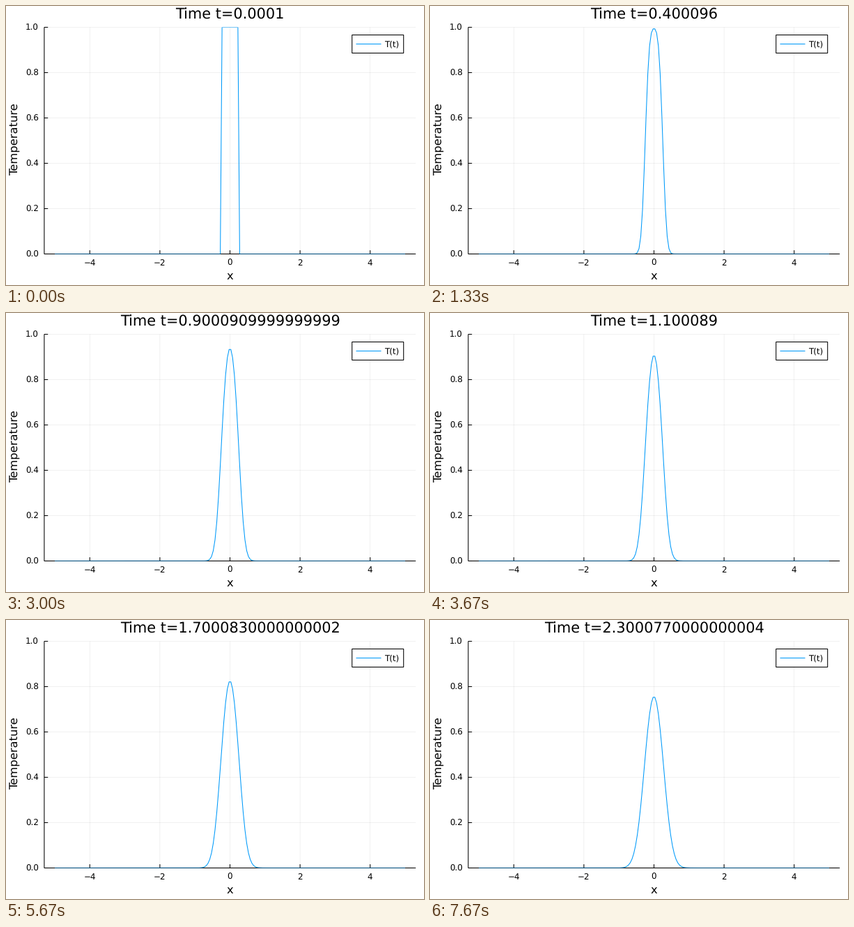
These frames come from a looping animation (600x400 px, 8000 ms). A matplotlib script:

```python
import math

import matplotlib.pyplot as plt
import numpy as np
from matplotlib.animation import FuncAnimation
from matplotlib.patches import Rectangle
from matplotlib.path import Path

WIDTH, HEIGHT, DPI = 600, 400, 100
STATES, LOOP_MS = 24, 8000
TICKS_PER_STATE = 10
FRAMES = STATES * TICKS_PER_STATE
PX = 72 / DPI  # points per pixel
BLUE = "#009AFA"
TITLE, GUIDE, SMALL = 20.83, 16.37, 11.9  # font sizes in pixels

# Plot area in pixels, measured from the top left corner
X0, X_SCALE = 321.5, 50.3
LEFT, RIGHT, TOP, BOTTOM = 54.9, 588.1, 30.5, 355.5

T_START, T_END, STEPS = 0.0001, 10.0, 100
DIFFUSIVITY, HALF_WIDTH = 0.01, 0.25
xs = np.linspace(-5, 5, 200)
erf = np.vectorize(math.erf)

plt.rcParams.update({"font.family": "DejaVu Sans", "text.hinting": "none"})
fig = plt.figure(figsize=(WIDTH / DPI, HEIGHT / DPI), dpi=DPI, facecolor="white")
stage = fig.add_axes([0, 0, 1, 1])
stage.set(xlim=(0, WIDTH), ylim=(HEIGHT, 0))
stage.axis("off")


def px(x):
    return X0 + X_SCALE * x


def py(y):
    return BOTTOM - (BOTTOM - TOP) * y


def line(x, y, color="black", width=1.05, **kwargs):
    return stage.plot(x, y, color=color, lw=width * PX, snap=False,
                      solid_capstyle="butt", **kwargs)[0]


def label(x, y, text, size, ha="center", **kwargs):
    return stage.text(x, y, text, fontsize=size * PX, ha=ha, va="baseline", **kwargs)


def time_at(step):
    s = step / STEPS
    return (1 - s) * T_START + s * T_END


def temperature(t):
    """Heat equation solution for an initially hot slab."""
    spread = math.sqrt(4 * DIFFUSIVITY * t)
    return (erf((HALF_WIDTH - xs) / spread) + erf((HALF_WIDTH + xs) / spread)) / 2


def draw_axes():
    grid = dict(alpha=0.1, width=0.55, zorder=1)
    for x in (-4, -2, 0, 2, 4):
        line([px(x)] * 2, [TOP, BOTTOM], **grid)
        line([px(x)] * 2, [BOTTOM, BOTTOM - 5.3], zorder=2)
        label(px(x), 371.5, str(x).replace("-", "\u2212"), SMALL)
    for i in range(6):
        y = py(i / 5)
        line([LEFT, RIGHT], [y, y], **grid)
        line([LEFT, LEFT + 5.3], [y, y], zorder=2)
        label(47, y + 4.5, f"{i / 5:.1f}", SMALL, ha="right")
    line([LEFT, LEFT], [TOP, BOTTOM], zorder=2)
    line([LEFT, RIGHT], [BOTTOM, BOTTOM], zorder=2)
    label(X0, 391.5, "x", GUIDE)
    label(17.6, 191.5, "Temperature", GUIDE, rotation=90, rotation_mode="anchor")


def draw_legend():
    stage.add_patch(Rectangle((496.7, 41.5), 74, 26, fc="white", ec="black",
                              lw=1.05 * PX, snap=False, zorder=5))
    line([502.5, 538.5], [54.5, 54.5], BLUE, zorder=6)
    label(543.4, 58.3, "T(t)", SMALL, ha="left", zorder=6)


draw_axes()
draw_legend()
title = label(X0, 18.5, "", TITLE)
curve = line([], [], BLUE, zorder=3)
# A path clip is antialiased, so lines on the border keep half their width
plot_area = Path([(LEFT, TOP), (RIGHT, TOP), (RIGHT, BOTTOM), (LEFT, BOTTOM),
                  (LEFT, TOP)])
curve.set_clip_path(plot_area, stage.transData)


def update(frame):
    # States change just ahead of each third of a second
    t = time_at((frame + 1) // TICKS_PER_STATE % STATES)
    title.set_text(f"Time t={t}")
    curve.set_data(px(xs), py(temperature(t)))
    return title, curve


anim = FuncAnimation(fig, update, frames=FRAMES, interval=LOOP_MS / FRAMES,
                     init_func=lambda: update(0), repeat=True, repeat_delay=0)
plt.show()
```
